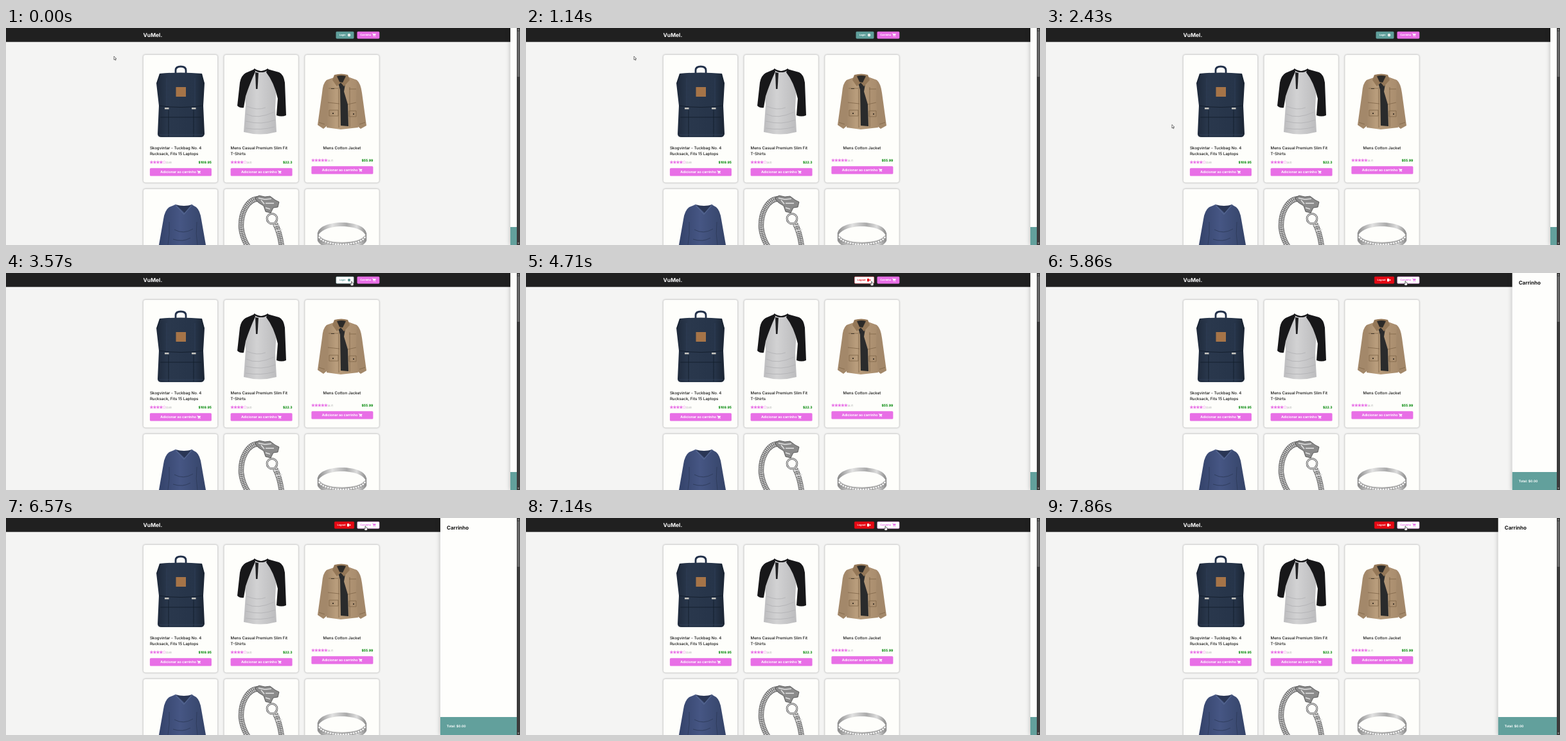
An HTML page that plays this animation: 800x338 px, repeating every 8 s.

```html
<!DOCTYPE html>
<html lang="pt">
<head>
<meta charset="utf-8">
<title>Loja</title>
<style>
html, body { margin: 0; height: 100%; overflow: hidden; background: #f4f4f3; }
svg { display: block; width: 100vw; height: 100vh; }
text { font-family: Inter, "Open Sans", sans-serif; font-weight: 700; text-rendering: geometricPrecision; white-space: pre; }
.name { font-size: 6.15px; font-weight: 500; fill: #111; }
.rate { font-size: 4px; font-weight: 400; fill: #999; }
.price { font-size: 5px; font-weight: 800; fill: #078a0c; text-anchor: end; }
.card { fill: #fefefb; stroke: #d2d2d2; stroke-width: .8; filter: drop-shadow(0 0 1px #0003); }
#panel { filter: drop-shadow(-1px 0 3px #0003); }
</style>
</head>
<body>
<svg id="stage" viewBox="0 0 800 338" preserveAspectRatio="none">
<defs>
  <path id="star" d="M0-2.5.7-.8 2.5-.7 1.1.5 1.6 2.3 0 1.3-1.6 2.3-1.1.5-2.5-.7-.7-.8Z"/>
  <g id="cart">
    <path d="M-2.8-2.2H-1.9L-1.1 1H2.1" fill="none" stroke="currentColor" stroke-width=".65"/>
    <path d="M-1.7-1.7H2.8L2 .5H-1.2Z" fill="currentColor"/>
    <circle cx="-.8" cy="2" r=".6" fill="currentColor"/><circle cx="1.7" cy="2" r=".6" fill="currentColor"/>
  </g>
  <linearGradient id="navy"><stop stop-color="#1e293a"/><stop offset=".25" stop-color="#2a384d"/><stop offset=".8" stop-color="#263449"/><stop offset="1" stop-color="#1a2432"/></linearGradient>
  <linearGradient id="grey"><stop stop-color="#bcbcbe"/><stop offset=".4" stop-color="#d2d2d3"/><stop offset="1" stop-color="#bcbcbe"/></linearGradient>
  <linearGradient id="tan"><stop stop-color="#a3886a"/><stop offset=".3" stop-color="#b99d7c"/><stop offset="1" stop-color="#a88c6d"/></linearGradient>
  <linearGradient id="blue"><stop stop-color="#34436a"/><stop offset=".45" stop-color="#465684"/><stop offset="1" stop-color="#354468"/></linearGradient>
  <linearGradient id="silver"><stop stop-color="#888"/><stop offset=".3" stop-color="#e2e2e2"/><stop offset=".6" stop-color="#aaa"/><stop offset=".8" stop-color="#ddd"/><stop offset="1" stop-color="#888"/></linearGradient>
</defs>

<g id="cards"></g>

<g id="backpack">
  <path d="M264 74V66Q264 60 272 60T280 66V74" fill="none" stroke="#23314a" stroke-width="2.8"/>
  <path d="M239 71Q272 68 305 71L309 86 307 121 309 165Q308 170 303 170H242Q236 170 236 165L238 121 234 86Z" fill="url(#navy)"/>
  <path d="M235 86 240 72M308 86 304 72M238 121Q272 126 307 121M240 139H304M253 128V169M292 128V169" fill="none" stroke="#141d2b" stroke-width=".9"/>
  <path d="M250 78V122M294 78V122M239 166H306" stroke="#35455e" stroke-width=".6"/>
  <path d="M247 124h6.5v2.6h-6.5zM289 124h6.5v2.6h-6.5z" fill="#c9c7c1"/>
  <rect x="264.5" y="92" width="15.5" height="15" fill="#a67448"/>
</g>

<g id="raglan">
  <path d="M386 65Q398 71 408 65L421 90 419 125 421 162Q396 169 370 162L373 120 371 90Z" fill="url(#grey)"/>
  <path d="M387 64 373 70Q366 74 364 85L360 121Q364 125 370 124L373 106Q380 85 388 68Z" fill="#171719"/>
  <path d="M407 64 425 69Q432 72 434 85L436 136Q429 139 421 136L423 110Q417 84 405 69Z" fill="#171719"/>
  <path d="M386 64Q397 72 408 64" fill="none" stroke="#171719" stroke-width="2.2"/>
  <path d="M388 69 393 70 391.5 95 389 95Z" fill="#202022"/>
  <path d="M374 134Q391 143 417 131M373 145Q398 152 419 143M375 122Q391 129 404 124M373 156Q397 160 418 154" fill="none" stroke="#b0b0b3" stroke-width=".8"/>
</g>

<g id="jacket">
  <path d="M511 77 499 81Q493 86 492 101L485 151 494 157 500 152 504 104ZM532 76 546 81Q552 86 554 101L561 152 552 157 546 152 542 104Z" fill="#a3886a"/>
  <path d="M511 77 500 82 502 116 499 155 521 158 548 155 545 113 546 82 532 76Z" fill="url(#tan)"/>
  <path d="M514 76 520 96 521 152 533 153 532 119 526 99 530 76Z" fill="#2a2b2c"/>
  <path d="M511 73Q522 70 532 73L535 81 526 91 521 85 515 91 508 81Z" fill="#957858"/>
  <path d="M515 75Q522 73 529 75L524 85 519 84Z" fill="#2c2a28"/>
  <path d="M502 94H517M534 95H545M503 128H517V137H503ZM534 129H545V138H534ZM501 116 519 118M532 119 545 116M487 147 496 150M550 150 559 147M518 92V155M535 92V154" fill="none" stroke="#7f6548" stroke-width=".8"/>
  <path d="M506 94h5v1h-5zM508 132h2v2h-2zM540 133h2v2h-2z" fill="#43382c"/>
</g>

<g id="sweater">
  <path d="M264 275 254 279Q247 284 245 298L238 338H311L304 298Q302 284 296 279L289 275 277 282Z" fill="url(#blue)"/>
  <path d="M264 275Q277 279 290 275L278 288Z" fill="#2a3655"/>
  <path d="M263 275 277 290 290 275" fill="none" stroke="#53658f" stroke-width="1.4"/>
  <path d="M254 302Q255 322 252 338M297 302Q295 321 298 338M262 314Q276 322 291 313M260 329Q275 334 287 327" fill="none" stroke="#2e3b5b" stroke-width=".9"/>
</g>

<g id="bracelet" fill="none">
  <path class="rope" d="M396 266C375 264 365 290 366 311Q368 328 377 341"/>
  <path class="rope" d="M419 305Q426 318 429 340"/>
  <path d="M387 265 394 261 403 263 411 262 419 268 425 271 423 279 416 280 412 288 404 286 401 277 393 272Z" fill="#8b8b8b" stroke="#444" stroke-width=".8"/>
  <path d="M393 265 403 267 413 266M404 273 417 273M404 280 411 282M397 268 402 274M417 308 426 307M420 316 430 314" stroke="#e2e2e2" stroke-width="1.5"/>
  <circle cx="414" cy="297" r="7.8" stroke="#555" stroke-width="3"/>
  <circle cx="414" cy="297" r="7.8" stroke="#d6d6d6" stroke-width="1.5"/>
</g>

<g id="ring" fill="none">
  <path d="M485 321C485 297 561 297 561 321V327C559 303 487 303 485 327Z" fill="url(#silver)"/>
  <path d="M485 319C487 339 559 339 561 319V331C555 349 491 349 485 331Z" fill="url(#silver)" stroke="#999" stroke-width=".5"/>
  <path d="M487 325C494 341 552 341 559 325" stroke="#888" stroke-width="4"/>
  <path d="M487 325C494 341 552 341 559 325" stroke="#f2f2f2" stroke-width="2.7" stroke-dasharray="3 1"/>
</g>

<rect width="795" height="21.7" fill="#202020"/>
<text x="213.5" y="14" font-size="8.5" fill="#fff">VuMel.</text>
<g id="session"></g>
<g id="basket"></g>

<g id="panel">
  <rect width="125" height="338" fill="#fefefc"/>
  <rect y="310" width="125" height="28" fill="#62a09c"/>
  <text x="10" y="18.3" font-size="8" fill="#111">Carrinho</text>
  <text x="10" y="325.8" font-size="5" font-weight="800" fill="#fff">Total: $0.00</text>
</g>

<rect x="795" width="5" height="338" fill="#3b3b3b"/>
<rect x="795.7" y="5" width="3.6" height="71" fill="#686868"/>
<path d="M796 3.5 797.5 1.5 799 3.5ZM796 334.5 797.5 336.5 799 334.5Z" fill="#aaa"/>

<path id="arrow" d="M0 0V5.5L1.3 4.4 2.2 6.3 3.1 5.9 2.2 4 4 3.9Z" fill="#fff" stroke="#222" stroke-width=".6"/>
<path id="hand" d="M-.6.4Q0-.5.6.4V2.5L3 3.1V5L2.2 6.8H-.9L-2.4 4.3-1.8 3.7-.6 4.6Z" fill="#fff" stroke="#222" stroke-width=".6"/>
</svg>
<script>
const $ = id => document.getElementById(id);
const PINK = '#e86fe6', TEAL = '#609f9b', RED = '#e50914';

// Product cards
const products = [
  { x: 213.5, lines: ['Skogvintar - Tuckbag No. 4', 'Rucksack, Fits 15 Laptops'], rate: '3.9', price: '$109.95' },
  { x: 339.2, lines: ['Mens Casual Premium Slim Fit', 'T-Shirts'], rate: '4.1', price: '$22.3' },
  { x: 465, lines: ['Mens Cotton Jacket'], rate: '4.7', price: '$55.99' }
];

function card({ x, lines, rate, price }) {
  const left = x + 10.4, single = lines.length === 1, y = single ? 206 : 209;
  const names = lines.map((line, i) => single
    ? `<text class="name" x="${x + 58}" y="188.8" text-anchor="middle">${line}</text>`
    : `<text class="name" x="${left}" y="${188.8 + 9 * i}">${line}</text>`).join('');
  const stars = [0, 1, 2, 3, 4].map(i => `<use href="#star" x="${left + 2.5 + 5 * i}" y="${y}"
    fill="${i < Math.round(rate) ? PINK : 'none'}" stroke="${PINK}" stroke-width=".3"/>`).join('');
  return `<rect class="card" x="${x}" y="41.5" width="116" height="199.5" rx="3.5"/>
    <rect class="card" x="${x}" y="250.5" width="116" height="200" rx="3.5"/>
    ${names}${stars}
    <text class="rate" x="${left + 25.2}" y="${y + 1.5}">(${rate})</text>
    <text class="price" x="${left + 96}" y="${y + 2}">${price}</text>
    <rect x="${left}" y="${y + 9.2}" width="96" height="12.4" rx="1.5" fill="${PINK}"/>
    <text x="${left + 16.4}" y="${y + 17.3}" font-size="5.3" fill="#fff">Adicionar ao carrinho</text>
    <use href="#cart" x="${left + 76.3}" y="${y + 15.4}" color="#fff"/>`;
}
$('cards').innerHTML = products.map(card).join('');

document.querySelectorAll('.rope').forEach(rope => {
  [['#6a6a6a', 8.5, 'none'], ['#d4d4d4', 6.8, '1.6 1.2'], ['#666', 1, '2 1']].forEach(([color, width, dash]) => {
    const strand = rope.cloneNode();
    strand.setAttribute('style', `stroke:${color};stroke-width:${width};stroke-dasharray:${dash}`);
    rope.before(strand);
  });
  rope.remove();
});

// Header buttons
const icons = {
  globe: '<circle cx="534" cy="11" r="2.2" fill="currentColor"/><path d="M532.6 11h2.8M534 9.6v2.8" stroke="#0004" stroke-width=".5"/>',
  door: '<path d="M531 8.8h3v4.4h-3zM534 10.4h1.2v-1l1.6 1.6-1.6 1.6v-1H534z" fill="currentColor"/>',
  cart: '<use href="#cart" x="573" y="10.8"/>'
};

function button(x, width, textX, size, label, icon, color, hovered) {
  const back = hovered ? '#fff' : color, ink = hovered ? color : '#fff';
  return `<g color="${ink}"><rect x="${x + .2}" y="5.8" width="${width - .4}" height="10.6" rx="1.3"
      fill="${back}" stroke="${color}" stroke-width=".4"/>
    <text x="${textX}" y="12.3" font-size="${size}" fill="${ink}">${label}</text>${icons[icon]}</g>`;
}

// Motion
const LOOP = 8000, LOGIN_CLICK = 4000, SLIDE = 500;
const CLOSED = 785, OPEN = 676;
const pointerPath = [
  [1290, 168, 44], [1720, 153.5, 95], [2290, 196, 150.5], [2600, 196, 150.5],
  [3300, 538, 13], [4850, 538, 13], [5400, 559.5, 12.5]
];
const toggles = [[5703, CLOSED, OPEN], [6600, OPEN, CLOSED], [7637, CLOSED, OPEN]];

const mix = (a, b, k) => a + (b - a) * k;
const clamp = k => Math.min(1, Math.max(0, k));
const smooth = k => k * k * (3 - 2 * k);

// CSS "ease": cubic-bezier(.25, .1, .25, 1)
function ease(k) {
  let low = 0, high = 1;
  const curve = (s, a, b) => 3 * s * (1 - s) ** 2 * a + 3 * s * s * (1 - s) * b + s ** 3;
  for (let i = 0; i < 20; i++) {
    const mid = (low + high) / 2;
    if (curve(mid, .25, .25) < k) low = mid; else high = mid;
  }
  return curve(low, .1, 1);
}

function pointerAt(t) {
  const next = pointerPath.findIndex(([time]) => time > t);
  if (next < 1) return (next ? pointerPath.at(-1) : pointerPath[0]).slice(1);
  const [t0, x0, y0] = pointerPath[next - 1], [t1, x1, y1] = pointerPath[next];
  const k = smooth((t - t0) / (t1 - t0));
  return [mix(x0, x1, k), mix(y0, y1, k)];
}

function panelAt(t) {
  const last = toggles.filter(([time]) => time <= t).at(-1);
  return last ? mix(last[1], last[2], ease(clamp((t - last[0]) / SLIDE))) : CLOSED;
}

function draw(t) {
  const [x, y] = pointerAt(t), inBar = y > 5 && y < 17;
  const overSession = inBar && x > 511 && x < 542, overBasket = inBar && x > 546 && x < 582;
  $('session').innerHTML = t < LOGIN_CLICK
    ? button(513.5, 28, 518.7, 3.7, 'Login', 'globe', TEAL, overSession)
    : button(511, 31, 515.6, 3.8, 'Logout', 'door', RED, overSession);
  $('basket').innerHTML = button(546.5, 34.8, 551.2, 4, 'Carrinho', 'cart', PINK, overBasket);
  $('panel').setAttribute('transform', `translate(${panelAt(t)} 0)`);
  const overButton = overSession || overBasket;
  for (const [id, shown] of [['arrow', !overButton], ['hand', overButton]]) {
    $(id).setAttribute('transform', `translate(${x} ${y})`);
    $(id).setAttribute('visibility', shown ? 'visible' : 'hidden');
  }
}

const start = performance.now();
function tick() {
  draw((performance.now() - start) % LOOP);
  requestAnimationFrame(tick);
}
tick();
</script>
</body>
</html>
```
